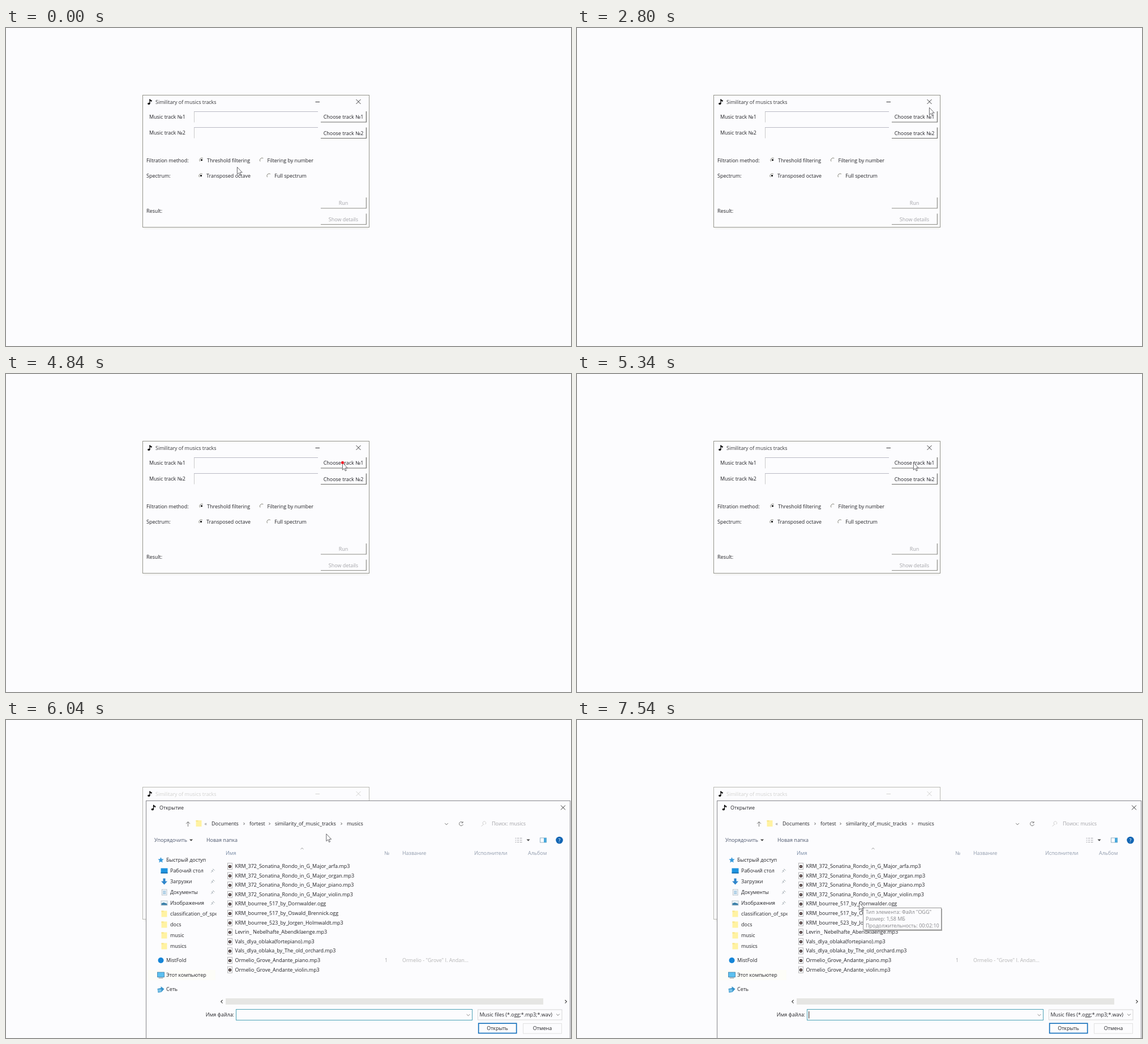
An HTML page for the animation above (8 s loop, 998 by 561 pixels).

```html
<!DOCTYPE html>
<html lang="en">
<head>
<meta charset="utf-8">
<title>Track similarity demo</title>
<style>
  html, body { margin: 0; width: 100%; height: 100%; overflow: hidden; background: #fcfcfe; }
  svg { display: block; width: 998px; height: 561px; }
  text { font: 8.95px "Open Sans", "Noto Sans", sans-serif; white-space: pre; }
</style>
</head>
<body>
<svg id="stage" viewBox="0 0 998 561" xmlns="http://www.w3.org/2000/svg"></svg>
<script>
const LOOP = 8000;
const BG = '#fcfcfe', INK = '#222226', SOFT = '#a4a4a8', BLUE = '#1a73bd';
const stage = document.getElementById('stage');
let layer = stage;

function add(tag, attrs, content) {
  const el = document.createElementNS(stage.namespaceURI, tag);
  for (const key in attrs) el.setAttribute(key, attrs[key]);
  if (content !== undefined) el.textContent = content;
  return layer.appendChild(el);
}
const text = (x, y, s, fill = INK, more) => add('text', { x, y, fill, ...more }, s);
const mid = (x, y, s, fill) => text(x, y, s, fill, { 'text-anchor': 'middle' });
const box = (x, y, width, height, fill, stroke = 'none', w = 1) =>
  add('rect', { x, y, width, height, fill, stroke, 'stroke-width': w });
const line = (d, stroke = INK, w = 1) => add('path', { d, stroke, 'stroke-width': w, fill: 'none' });
const shape = (d, fill) => add('path', { d, fill });
const dot = (cx, cy, r, fill) => add('circle', { cx, cy, r, fill });

function group(parent, draw) {
  const outer = layer;
  layer = parent;
  const g = layer = add('g', {});
  draw();
  layer = outer;
  return g;
}
const show = (el, on) => el.setAttribute('visibility', on ? 'visible' : 'hidden');

function note(x, y) {
  add('ellipse', { cx: x - 1.7, cy: y + 3, rx: 2.2, ry: 1.7, fill: '#000' });
  line(`M${x} ${y + 3}V${y - 4.5}`, '#000', 1.3);
  shape(`M${x - .6} ${y - 5}H${x + 1}Q${x + 1} ${y - 3} ${x + 4} ${y - 3}Q${x + 4} ${y - 1} ${x + 2.4} ${y}Q${x + 3} ${y - 1.6} ${x} ${y - 2}Z`, '#000');
}
const cross = (x, y, r, c, w = 1) =>
  line(`M${x - r} ${y - r}L${x + r} ${y + r}M${x + r} ${y - r}L${x - r} ${y + r}`, c, w);
const chevron = (x, y, c = '#777') => line(`M${x - 2.8} ${y - 1.4}l2.8 2.8l2.8 -2.8`, c);
const arrowDown = (x, y) => shape(`M${x - 3} ${y - 1.5}h6l-3 3.2z`, '#444');

/* Main window */

function radio(x, y, on) {
  line(`M${x - 2.8} ${y + 2.6}A4 4 0 0 1 ${x + 2.6} ${y - 3}`, '#85857a');
  if (on) dot(x + .2, y, 1.6, '#000');
}

function button(y, label, enabled) {
  line(`M556 ${y + 19}H636.4V${y}`, enabled ? '#6c6c68' : '#8e8e88', 1.2);
  mid(596, y + 13.3, label, enabled ? INK : SOFT);
}

function field(y) {
  line(`M332.5 ${y + 19}V${y}`, '#c9c9ca');
  line(`M332 ${y}H551`, '#b9b9c4');
}

function chrome(ink, edge) {
  box(241.5, 118.5, 400, 233, 'none', edge);
  text(264, 133.7, 'Similitary of musics tracks', ink);
  line('M546.5 130.5H554', ink);
  cross(622.5, 130, 4, ink);
}

box(0, 0, 998, 561, BG);
line('M244 353.9H640', '#e6e6e0');
box(241.5, 118.5, 400, 233, BG);
note(254, 130.5);
const activeChrome = group(stage, () => chrome('#37373a', '#93938a'));
const idleChrome = group(stage, () => chrome('#d2d2d0', '#b9b9b2'));
text(253, 159.8, 'Music track №1');
text(253, 188.3, 'Music track №2');
field(147.5);
field(175.5);
button(147, 'Choose track №1', true);
button(175.5, 'Choose track №2', true);
text(248, 236.7, 'Filtration method:');
radio(345.3, 232.8, true);
text(355, 236.7, 'Threshold filtering');
radio(451.8, 232.8);
text(461.5, 236.7, 'Filtering by number');
text(248, 264.2, 'Spectrum:');
radio(344.3, 260.5, true);
text(354, 264.2, 'Transposed octave');
radio(464.3, 260.5);
text(474.3, 264.2, 'Full spectrum');
text(248, 326.2, 'Result:');
button(299, 'Run', false);
button(327.5, 'Show details', false);

/* File dialog */

const folder = (x, y) => {
  box(x - 5, y - 5.5, 10, 11, '#fff2a2');
  box(x - 5, y - 5.5, 4, 2, '#f7e488');
};
const icons = {
  star: (x, y) => shape(`M${x} ${y - 5}l1.5 3.3l3.6 .3l-2.7 2.4l.8 3.6l-3.2 -1.9l-3.2 1.9l.8 -3.6l-2.7 -2.4l3.6 -.3z`, '#3a9bdc'),
  desk: (x, y) => {
    box(x - 6, y - 4.5, 12, 9, '#1e94e0');
    box(x - 6, y + 3, 12, 1.5, '#1668a8');
  },
  down: (x, y) => shape(`M${x - 2} ${y - 5.5}h4v5h3.5l-5.5 6l-5.5 -6h3.5z`, '#2f86cc'),
  page: (x, y) => {
    box(x - 4, y - 5, 8.5, 10, '#fff', '#a9b4bd', .8);
    line(`M${x - 2.5} ${y - 2}h5.5m-5.5 2.2h5.5m-5.5 2.2h5.5`, '#4d94c4', .9);
  },
  image: (x, y) => {
    box(x - 5.5, y - 4, 11, 8, '#eef6fa', '#b2bcc4', .8);
    shape(`M${x - 5} ${y + 3.5}v-3l4 -1.5l6 2v2.5z`, '#3a7fa8');
  },
  folder,
  disc: (x, y) => dot(x, y, 5, '#1585d8'),
  pc: (x, y) => {
    box(x - 6, y - 5, 12, 8.5, '#5cc0f0', '#3a7ca5', .8);
    line(`M${x - 4} ${y + 5.2}h8`, '#6b8797');
  },
  net: (x, y) => {
    shape(`M${x - 6} ${y - 1}l6 -1v-3l6 4.5l-5 5.5l-6 1z`, '#3793cb');
    box(x - 5, y, 6, 4.5, '#7cc3e8');
  }
};
const places = [
  ['star', 'Быстрый доступ', 247], ['desk', 'Рабочий стол', 266, 1], ['down', 'Загрузки', 285, 1],
  ['page', 'Документы', 304, 1], ['image', 'Изображения', 323, 1], ['folder', 'classification_of_spe', 342, 1],
  ['folder', 'docs', 361, 1], ['folder', 'music', 380, 1], ['folder', 'musics', 399, 1],
  ['disc', 'MistFold', 424], ['pc', 'Этот компьютер', 450], ['net', 'Сеть', 475]
];
const files = [
  ...['arfa', 'organ', 'piano', 'violin'].map(s => `KRM_372_Sonatina_Rondo_in_G_Major_${s}.mp3`),
  'KRM_bourree_517_by_Dornwalder.ogg',
  'KRM_bourree_517_by_Oswald_Brennick.ogg',
  'KRM_bourree_523_by_Jorgen_Holmwaldt.mp3',
  'Levrin_ Nebelhafte_Abendklaenge.mp3',
  'Vals_dlya_oblaka(fortepiano).mp3',
  'Vals_dlya_oblaka_by_The_old_orchard.mp3',
  'Ormelio_Grove_Andante_piano.mp3',
  'Ormelio_Grove_Andante_violin.mp3'
];

let glow, caret;
const dialog = group(stage, () => {
  box(247.5, 142.5, 749, 422, BG, '#85858a');
  note(260.5, 154.8);
  text(271, 158.2, 'Открытие');
  cross(984, 154.5, 3.9, '#333');

  // Address row
  line('M321.5 188V179.5M318 183l3.5 -3.5l3.5 3.5', '#777');
  folder(340.5, 182.5);
  text(350.5, 185.5, '«', '#777');
  [[363, 'Documents'], [430, 'fortest'], [475, 'similarity_of_music_tracks'], [602, 'musics']]
    .forEach(([x, s]) => text(x, 186.2, s));
  [420.5, 465.5, 592.5].forEach(x => line(`M${x - 1} 181l2 2l-2 2`, '#555'));
  chevron(778, 183.5);
  line('M806.5 180.6A3.5 3.5 0 1 0 807.4 184M807 179v2.5h-2.5', '#777');
  line('M844.5 184.5A2.8 2.8 0 1 1 846.5 184M843 184.5l-3.5 3', '#d0d0d0');
  text(858, 186.2, 'Поиск: musics', '#a2a2a6');

  // Toolbar
  text(262, 215.3, 'Упорядочить', '#4c566c');
  arrowDown(327, 212);
  text(354, 215.3, 'Новая папка', '#4c566c');
  [208.5, 212, 215.5].forEach(y => line(`M899.5 ${y}h2m1.5 0h3m1.5 0h4`, '#a5a5aa'));
  arrowDown(922.5, 212);
  box(943.5, 208, 11, 8, '#fff', '#88a8bc', .9);
  box(950, 208, 4.5, 8, '#48a9dd');
  dot(977.5, 212, 6.3, '#1266b4');
  text(977.5, 215.5, '?', '#fff', { 'text-anchor': 'middle', 'font-weight': 700 });

  // Column headers
  [[388, 'Имя', '#7487a2'], [668, '№'], [700, 'Название'], [827, 'Исполнители'], [922, 'Альбом']]
    .forEach(([x, s, c]) => text(x, 238.3, s, c || '#909bac'));
  line('M520.5 228l2.5 -2.3l2.5 2.3', '#999');

  glow = box(248, 441, 122, 18, '#fdfdf8');
  places.forEach(([icon, label, y, deep], i) => {
    icons[icon](deep ? 279.5 : 273.5, y);
    text(deep ? 290 : 283, y + 3.2, label);
    if (i > 0 && i < 5) line(`M362 ${y + 3}l2.5 -2.5m-1.5 -1.5l3 3m-2 -2l2.5 -2.5m-1 -1l3 3`, '#9aa4ac', .9);
  });
  // The long folder name is cut at the pane edge
  box(371.5, 335, 16, 14, BG);

  files.forEach((name, i) => {
    const y = 258 + i * 16.6;
    box(391.5, y - 5.5, 8, 11, '#fdfdfd', '#a5a5a8', .8);
    dot(395.5, y + .4, 2.7, '#3e3638');
    dot(395.5, y + .4, .9, '#f0b8b0');
    text(404.5, y + 3, name);
  });
  text(669, 427.2, '1', SOFT);
  text(700, 427.2, 'Ormelio - "Grove" I. Andan...', '#b4b4b4');

  // Scroll bar and footer
  box(388, 491, 561, 11, '#e6e6e4');
  line('M382.5 494l-2.8 2.8l2.8 2.8M987.5 494l2.8 2.8l-2.8 2.8', '#444', 1.2);
  text(403, 523.2, 'Имя файла:', INK, { 'text-anchor': 'end' });
  box(406.5, 510.5, 417, 19, BG, '#4ca2b6');
  caret = line('M409.7 514V526.5', '#222');
  chevron(816.5, 520.5, '#888');
  box(833.5, 511, 148.5, 18, BG, '#d8d8d8');
  text(836.5, 523.2, 'Music files (*.ogg;*.mp3;*.wav)');
  chevron(975, 520);
  box(834.7, 535.2, 67, 17.3, BG, BLUE, 1.7);
  mid(868, 547.2, 'Открыть');
  box(913.5, 535.5, 68, 17.5, BG, '#e2e2e2');
  mid(947.5, 547.2, 'Отмена');
});

const tip = (x, y, lines) => group(stage, () => {
  box(x + 1.5, y + 1.5, 138, 39, '#a8a8a8');
  box(x, y, 138, 38.5, BG, '#969696');
  lines.forEach((s, i) => text(x + 4.5, y + 10.2 + i * 12, s, '#858588'));
});
const tips = [
  [6650, 6860, tip(525.5, 284, ['Тип элемента: Файл "MP3"', 'Размер: 20,1 МБ', 'Продолжительность: 00:08:48'])],
  [7440, LOOP, tip(505.5, 331.5, ['Тип элемента: Файл "OGG"', 'Размер: 1,58 МБ', 'Продолжительность: 00:02:10'])]
];

/* Pointer */

const pointer = group(stage, () => add('path', {
  d: 'M.4 .4V13.2L3.3 10.5L5.3 15L7.2 14.2L5.3 9.8H9.2Z',
  fill: '#fff', stroke: '#55555a', 'stroke-width': .9
}));
const click = group(stage, () => dot(594.5, 156.3, 2.6, '#f0202c'));

const path = [
  [0, 408, 245], [420, 418, 240], [840, 410, 246], [1230, 276, 318], [1670, 262, 321], [1850, 240, 312],
  [2500, 615, 146], [2800, 622, 140], [3300, 624, 147], [4170, 598, 191], [4470, 588, 154],
  [4640, 588, 154], [4700, 594, 156], [5870, 594, 156], [6280, 518, 274], [6680, 518, 274],
  [6770, 524, 287], [7080, 498, 322], [LOOP, 498, 322]
];

function pointerAt(t) {
  const i = Math.max(1, path.findIndex(p => p[0] > t));
  const [t0, x0, y0] = path[i - 1], [t1, x1, y1] = path[i];
  const p = (t - t0) / (t1 - t0), e = p * p * (3 - 2 * p);
  return [x0 + (x1 - x0) * e, y0 + (y1 - y0) * e];
}

const OPEN = 5390, BLINK = 530, BLINK_FROM = OPEN + 30;

function render(t) {
  const [x, y] = pointerAt(t);
  pointer.setAttribute('transform', `translate(${x.toFixed(1)} ${y.toFixed(1)})`);
  show(click, t >= 4830 && t < 5060);

  const open = t >= OPEN;
  show(activeChrome, !open);
  show(idleChrome, open);
  dialog.setAttribute('display', open ? 'inline' : 'none');
  if (open) {
    const p = Math.min(1, (t - OPEN) / 190);
    const k = 1 - .1 * (1 - p) ** 3;
    dialog.setAttribute('transform', `translate(622 352) scale(${k}) translate(-622 -352)`);
    dialog.setAttribute('opacity', Math.min(1, p * 1.45));
    show(glow, t >= 5690);
    show(caret, Math.trunc((t - BLINK_FROM) / BLINK) % 2 === 0);
  }
  for (const [from, to, el] of tips) show(el, t >= from && t < to);
}

const start = performance.now();
function tick() {
  render((performance.now() - start) % LOOP);
  requestAnimationFrame(tick);
}
tick();
</script>
</body>
</html>
```
